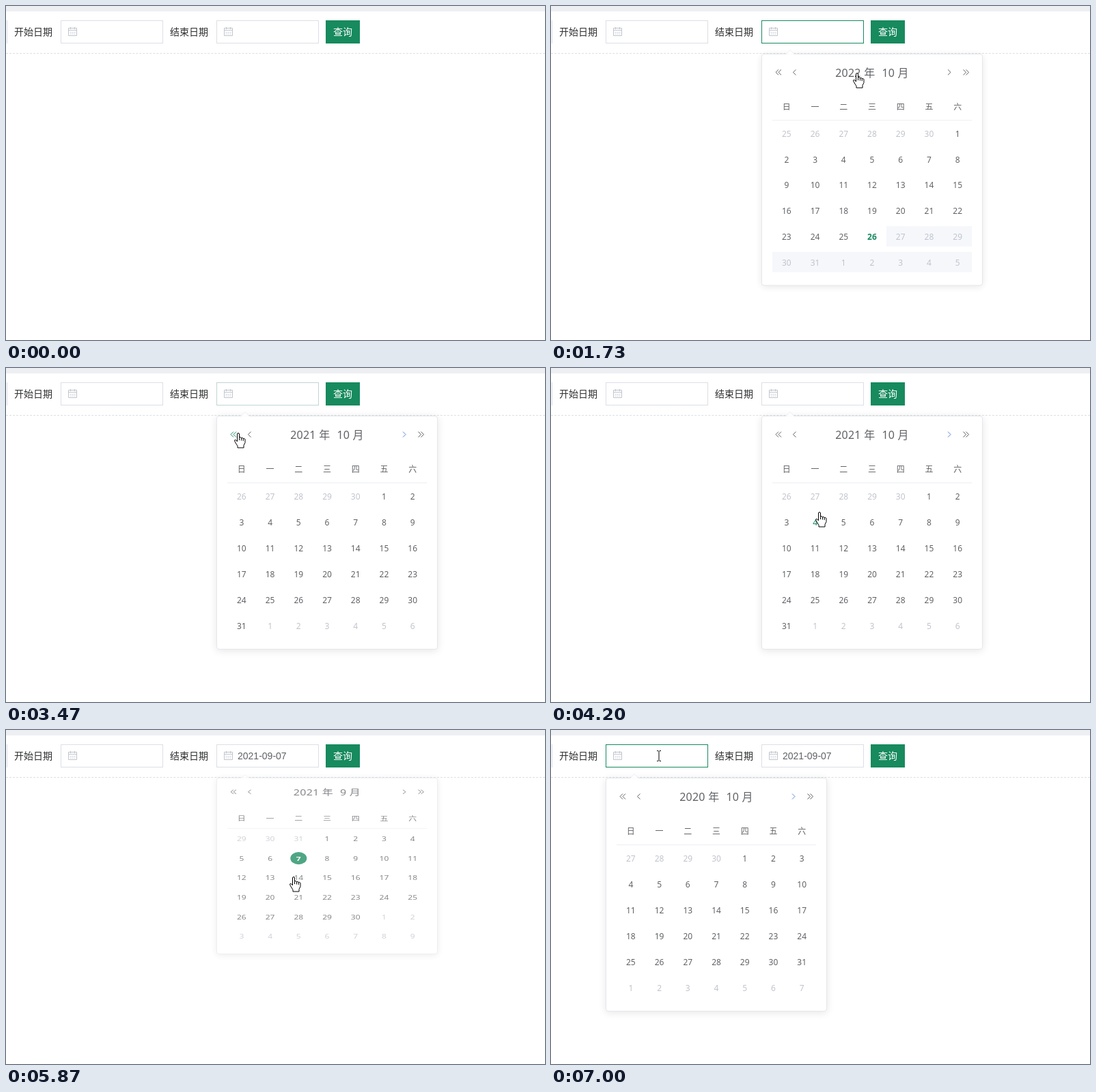
An HTML page that plays this animation: 789 px wide and 490 px high, repeating every 8000 ms.

```html
<!DOCTYPE html>
<html lang="zh-CN">
<head>
<meta charset="utf-8">
<title>日期选择</title>
<style>
html, body { margin: 0; width: 100%; height: 100%; overflow: hidden; background: #fff; }
#stage { position: relative; width: 789px; height: 490px; overflow: hidden; }
#stage > * { position: absolute; }
svg { display: block; overflow: visible; }
text { font-family: "Noto Sans", "Noto Sans CJK SC", "Noto Sans CJK", sans-serif; }
.bar { left: 0; top: 0; width: 789px; height: 8px; background: #eeeff3; }
.rule { left: 0; top: 69px; width: 789px; border-top: 1px dashed #dcdfe2; }
.label { font-size: 14px; fill: #303133; }
.value { font: 14px "Liberation Sans", Arial, sans-serif; fill: #606266; }
.icon { fill: none; stroke: #c0c4cc; }
#popup {
  top: 70px; width: 322px; height: 341px; background: #fff;
  border: 1px solid #e4e7ed; border-radius: 4px;
  box-shadow: 0 2px 12px rgba(0, 0, 0, .1); transform-origin: center top;
}
#popup svg { position: absolute; left: -1px; top: -1px; }
#popup text { text-anchor: middle; font-size: 12px; fill: #606266; }
#popup .title { font-size: 16px; letter-spacing: .25px; }
.chevron { fill: none; stroke: #606266; }
.pointer path { fill: #fff; stroke: #000; }
</style>
</head>
<body>
<div id="stage">
  <div class="bar"></div>
  <div class="rule"></div>
  <svg id="form" width="789" height="490">
    <path d="M1.5 21V55" stroke="#dcdfe6"/>
    <text class="label" x="12" y="43">开始日期</text>
    <text class="label" x="240" y="43">结束日期</text>
    <rect id="start" x="80.5" y="21.5" width="149" height="33" fill="#fff"/>
    <rect id="end" x="308.5" y="21.5" width="149" height="33" fill="#fff"/>
    <g id="calIcon" class="icon">
      <path d="M91.5 32.5H103.5V43.5H91.5ZM91.5 35.5H103.5M94.5 31V34M100.5 31V34"/>
      <path d="M93.5 38.5H102M93.5 41H102" stroke-dasharray="2 1" opacity=".8"/>
    </g>
    <use href="#calIcon" x="228"/>
    <text id="value" class="value" x="339" y="43"></text>
    <rect x="468" y="21" width="50" height="34" fill="#178a5e"/>
    <text x="479" y="43" font-size="14" font-weight="500" fill="#fff">查询</text>
  </svg>
  <div id="popup">
    <svg id="panel" width="324" height="343">
      <path d="M36 .8L42 -5.5L48 .8" fill="#fff" stroke="#ebeef5"/>
      <path d="M36.5 1.2H47.5" stroke="#fff"/>
      <path class="chevron" d="M25 23.5L21 27.5L25 31.5M29 23.5L25 27.5L29 31.5"/>
      <path class="chevron" d="M50.5 23.5L46.5 27.5L50.5 31.5"/>
      <path class="chevron" d="M273 23.5L277 27.5L273 31.5"/>
      <path class="chevron" d="M295.5 23.5L299.5 27.5L295.5 31.5M299.5 23.5L303.5 27.5L299.5 31.5"/>
      <text class="title" x="162" y="34"><tspan id="year"></tspan><tspan id="month" dx="10"></tspan></text>
      <path d="M16 98.5H308" stroke="#ebeef5"/>
      <g id="disabled" fill="#f5f7fb">
        <rect x="183" y="255" width="125" height="30"/>
        <rect x="16" y="293" width="292" height="30"/>
      </g>
      <circle id="picked" cx="120.3" cy="156.5" r="12" fill="#178a5e"/>
    </svg>
  </div>
  <svg class="pointer" width="789" height="490">
    <path id="arrow" d="M.5 .5V15.8L4.1 12.5L6.5 17.8L8.6 16.9L6.3 11.8H11.3Z"/>
    <g id="hand">
      <path d="M-1.5 12.5V2Q-1.5 .5 0 .5T1.5 2V7.5Q2 6.3 3 6.5T4.4 8Q5 7 6 7.3T7.2 9Q8 8 8.9 8.4T10 10V14.5L8 18.5V22H-1V19.5L-3.8 15L-5.5 11.8Q-5.6 10.2 -4 10.6T-1.5 13Z"/>
      <path d="M1.5 7.5V11M4.4 8V11.5M7.2 9V12"/>
    </g>
    <path id="beam" d="M-3 -7.5H-1L0 -6.5L1 -7.5H3M0 -6.5V6.5M-3 7.5H-1L0 6.5L1 7.5H3" style="fill:none"/>
  </svg>
</div>
<script>
const LOOP = 8000, TICK = 200 / 3;
const GREEN = [23, 138, 94], LINE = [220, 223, 230], HOVER = [192, 196, 204];
const green = `rgb(${GREEN})`;
const at = { open: 1535, blur: 3310, year: 3390, month: 5130, pick: 5849, reopen: 6690 };

// Pointer hot spot: tick, x, y
const path = [
  [5, 697, 474], [8, 311, 181], [10, 311, 181], [14, 332, 122], [18, 398, 54],
  [21, 440, 39], [23, 440, 39], [24, 443, 62], [26, 448, 98], [30, 430, 104],
  [33, 398, 118], [36, 372, 128], [40, 354, 95], [44, 354, 95], [48, 340, 95],
  [54, 340, 95], [60, 366, 168], [64, 402, 225], [67, 426, 207], [71, 396, 148],
  [74, 360, 90], [78, 360, 90], [82, 404, 178], [85, 421, 215], [88, 421, 215],
  [92, 226, 90], [93, 226, 90], [97, 158, 38], [120, 158, 38]
];

const $ = id => document.getElementById(id);
const clamp = v => Math.max(0, Math.min(1, v));
const mix = (a, b, p) => a.map((v, i) => Math.round(v + (b[i] - v) * p));
const inside = (p, x, y, w, h) => p && p.x >= x && p.x < x + w && p.y >= y && p.y < y + h;

function addText(x, y, content = '') {
  const el = document.createElementNS('http://www.w3.org/2000/svg', 'text');
  el.setAttribute('x', x);
  el.setAttribute('y', y);
  el.textContent = content;
  return $('panel').appendChild(el);
}
const colX = i => 16 + 292 / 7 * (i + .5);
[...'日一二三四五六'].forEach((d, i) => addText(colX(i), 83, d));
const cells = Array.from({ length: 42 }, (_, i) => addText(colX(i % 7), 123 + 38 * Math.floor(i / 7)));
const chevrons = document.querySelectorAll('.chevron');

// cubic-bezier(.23, 1, .32, 1)
function ease(x) {
  if (x <= 0 || x >= 1) return clamp(x);
  const curve = (s, a, b) => 3 * (1 - s) ** 2 * s * a + 3 * (1 - s) * s * s * b + s ** 3;
  let lo = 0, hi = 1;
  for (let i = 0; i < 20; i++) {
    const mid = (lo + hi) / 2;
    if (curve(mid, .23, .32) < x) lo = mid; else hi = mid;
  }
  return curve(lo, 1, 1);
}

function pointerAt(k) {
  const i = path.findIndex(p => p[0] > k);
  if (i < 1) return null;
  const [a, b] = [path[i - 1], path[i]], p = (k - a[0]) / (b[0] - a[0]);
  return { x: a[1] + (b[1] - a[1]) * p, y: a[2] + (b[2] - a[2]) * p };
}

function drawCalendar(year, month, hovered, picked) {
  const first = new Date(year, month - 1, 1).getDay();
  const last = new Date(year, month, 0).getDate();
  const now = year === 2022;
  $('year').textContent = year + ' 年';
  $('month').textContent = month + ' 月';
  $('disabled').style.display = now ? '' : 'none';
  $('picked').style.display = picked ? '' : 'none';
  cells.forEach((cell, i) => {
    const n = i - first + 1;
    const active = n > 0 && n <= (now ? 26 : last);
    const today = now && n === 26, chosen = picked && n === 7;
    cell.textContent = new Date(year, month - 1, n).getDate();
    cell.style.fill = chosen ? '#fff' : !active ? '#c0c4cc' : today || i === hovered ? green : '';
    cell.style.fontWeight = today || chosen ? 700 : 400;
  });
}

function drawInput(id, hover, focus) {
  $(id).setAttribute('stroke', `rgb(${mix(hover ? HOVER : LINE, GREEN, clamp(focus))})`);
}

function drawPointer(p, kind) {
  for (const id of ['arrow', 'hand', 'beam']) {
    $(id).style.display = p && id === kind ? '' : 'none';
    if (p) $(id).setAttribute('transform', `translate(${Math.round(p.x)} ${Math.round(p.y)})`);
  }
}

function render(k) {
  const t = k * TICK, p = pointerAt(k);
  const second = t >= at.reopen;
  const left = second ? 80 : 308;
  const show = second ? ease((t - at.reopen) / 300)
    : t < at.pick ? ease((t - at.open) / 300) : 1 - ease((t - at.pick) / 300);
  const live = t >= at.open && t < at.pick + TICK;
  const picked = t >= at.pick;

  const popup = $('popup');
  popup.style.left = left + 'px';
  popup.style.display = show > 0 ? '' : 'none';
  popup.style.opacity = show;
  popup.style.transform = show < 1 ? `scaleY(${show})` : 'none';

  const onGrid = live && inside(p, 324, 170, 292, 227);
  const hovered = onGrid && !picked
    ? Math.floor((p.y - 169) / 38) * 7 + Math.floor((p.x - 324) / 292 * 7) : -1;
  const onYear = live && inside(p, 327, 86, 16, 24);
  const onMonth = live && inside(p, 350, 86, 14, 24);
  const onTitle = live && inside(p, 415, 86, 110, 24);
  const onStart = inside(p, 80, 21, 150, 34);
  const onEnd = inside(p, 308, 21, 150, 34);

  if (second) drawCalendar(2020, 10, -1, false);
  else drawCalendar(t < at.year ? 2022 : 2021, t < at.month ? 10 : 9, hovered, picked);
  chevrons[0].style.stroke = onYear ? green : '';
  chevrons[1].style.stroke = onMonth ? green : '';
  chevrons[2].style.stroke = show === 1 ? '#5a87dc' : '';

  drawInput('start', onStart, (t - at.reopen + 60) / 200);
  drawInput('end', onEnd, t < at.blur ? (t - at.open) / 180 : 1 - (t - at.blur) / 180);
  $('value').textContent = picked ? '2021-09-07' : '';
  drawPointer(p, onStart || onEnd ? 'beam' : onGrid || onYear || onMonth || onTitle ? 'hand' : 'arrow');
}

let shown = -1;
const begin = performance.now();
function loop() {
  const k = Math.floor(((performance.now() - begin) % LOOP + 5) / TICK) % 120;
  if (k !== shown) render(shown = k);
  requestAnimationFrame(loop);
}
loop();
</script>
</body>
</html>
```
